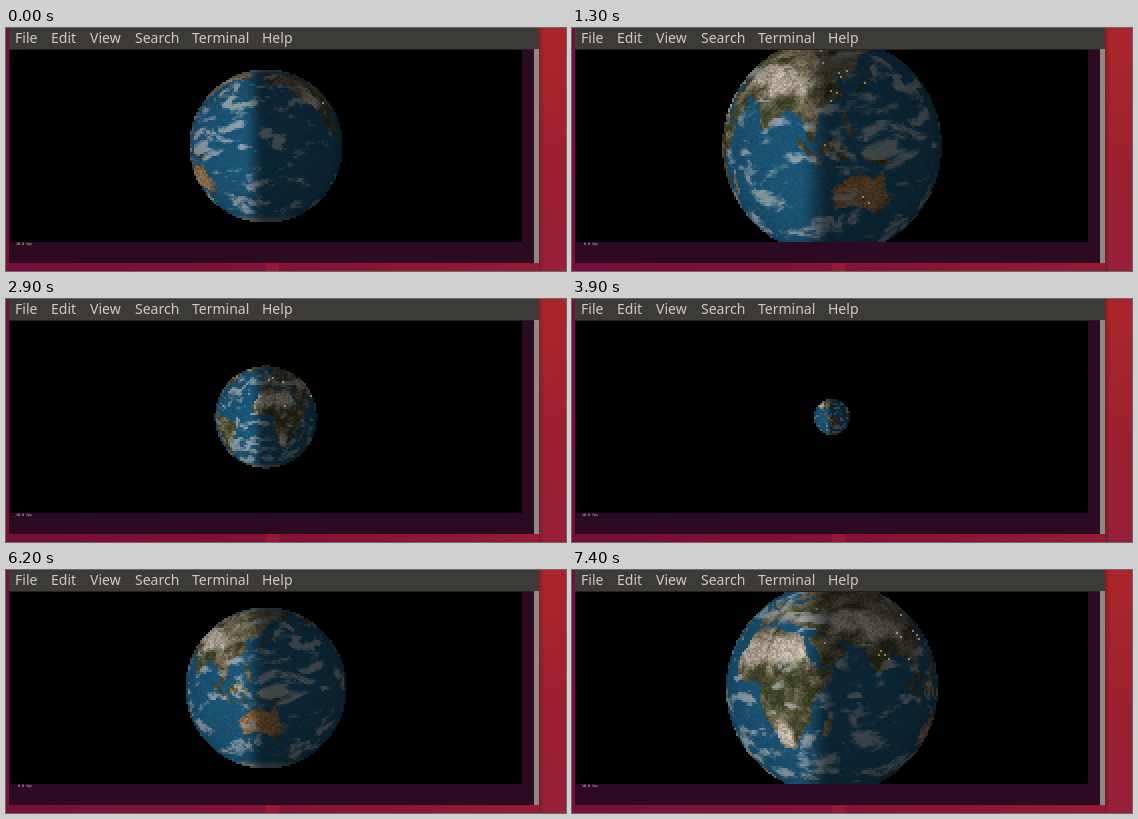
Animation of 560 by 243 pixels, one loop 7500 ms. Source, as an HTML page with a canvas:

```html
<!DOCTYPE html>
<html lang="en">
<head>
<meta charset="utf-8">
<title>Terminal globe</title>
<style>
html, body { margin: 0; width: 100%; height: 100%; overflow: hidden; }
#stage { position: relative; width: 560px; height: 243px; overflow: hidden;
  background: linear-gradient(90deg, #760f3c, #7c1038 30%, #8c1535 70%, #971d33); }
#stage > * { position: absolute; }
.side { left: 533px; top: 0; width: 27px; height: 243px;
  background: linear-gradient(90deg, #0003, #0000 5px), linear-gradient(170deg, #ab262b, #9c2030 55%, #98203a); }
.glow { left: 260px; top: 235px; width: 13px; height: 8px; background: #961938; }
.window { left: 3px; top: 0; width: 530px; height: 235px; background: #2c0a21; }
.menu { left: 3px; top: 0; width: 530px; height: 21px; background: #3c3b37; border-bottom: 1px solid #24221f; }
.menu span { position: absolute; top: 0; color: #cfcac1;
  font: 14px/20px "Noto Sans", "Open Sans", sans-serif; white-space: pre; }
.scroll { left: 528px; top: 21px; width: 5px; height: 214px; background: #8f8985; }
#globe { left: 4px; top: 22px; width: 512px; height: 192px; background: #000; image-rendering: pixelated; }
svg { left: 0; top: 210px; }
</style>
</head>
<body>
<div id="stage">
  <div class="side"></div>
  <div class="glow"></div>
  <div class="window"></div>
  <div class="menu">
    <span style="left:6px">File</span><span style="left:42px">Edit</span>
    <span style="left:81px">View</span><span style="left:126px">Search</span>
    <span style="left:183px">Terminal</span><span style="left:253px">Help</span>
  </div>
  <div class="scroll"></div>
  <canvas id="globe" width="256" height="96"></canvas>
  <svg width="60" height="12"><text id="fps" x="10" y="7.2" fill="#e4dfe2"
    font-family="DejaVu Sans Mono, monospace" font-size="3.33"></text></svg>
</div>
<script>
const LOOP = 7500, STEP = 100, HITCHES = [12, 35, 61];
const W = 256, H = 96, MW = 480, MH = 240, SCALE = MW / 360, RAD = Math.PI / 180;

const ease = v => { v = Math.min(1, Math.max(0, v)); return v * v * (3 - 2 * v); };
const mix = (a, b, t) => a.map((v, i) => v + (b[i] - v) * t);
const rgb = hex => [16, 8, 0].map(s => hex >> s & 255);
const wrap = lon => ((lon + 180) % 360 + 360) % 360 - 180;
// Soft bump on the map, 1 in the middle and falling off over w by h degrees.
const bump = (lon, lat, [x, y, w, h]) =>
  Math.exp(-((wrap(lon - x) / w) ** 2) - ((lat - y) / h) ** 2);
const bumps = (lon, lat, spots) => Math.max(...spots.map(s => bump(lon, lat, s)));

let seed = 7;
const rnd = () => (seed = (seed * 16807) % 2147483647) / 2147483647;

function hash(x, y, z) {
  let h = Math.imul(x, 374761393) ^ Math.imul(y, 668265263) ^ Math.imul(z, 1274126177);
  h = Math.imul(h ^ h >>> 13, 1274126177);
  return ((h ^ h >>> 16) >>> 0) / 2 ** 32;
}
function noise(x, y, z) {
  const a = Math.floor(x), b = Math.floor(y), c = Math.floor(z);
  const u = ease(x - a), v = ease(y - b), w = ease(z - c);
  let sum = 0;
  for (let i = 0; i < 8; i++) {
    const dx = i & 1, dy = i >> 1 & 1, dz = i >> 2;
    sum += hash(a + dx, b + dy, c + dz) * (dx ? u : 1 - u) * (dy ? v : 1 - v) * (dz ? w : 1 - w);
  }
  return sum;
}
function fbm(x, y, z, octaves = 4) {
  let sum = 0, total = 0;
  for (let k = 0, amp = 1, f = 1; k < octaves; k++, amp *= .55, f *= 2.1) {
    sum += amp * noise(x * f, y * f, z * f);
    total += amp;
  }
  return sum / total;
}

// Key points (longitude, latitude) of the coasts; roughened when drawn.
const coasts = {
  africa: [-17,15, -8,34, 10,37, 32,31, 43,12, 51,11, 40,-5, 39,-17, 26,-34, 18,-33, 9,3, -8,5],
  eurasia: [-9,37, -9,43, 8,54, 22,55, 40,67, 105,77, 179,69, 160,60, 138,55, 128,40, 118,39,
    121,29, 108,20, 103,2, 97,17, 89,22, 77,8, 70,22, 48,30, 36,36, 24,38, 18,41, 9,44, -1,38],
  arabia: [35,31, 48,31, 59,22, 44,13],
  nordic: [6,59, 18,58, 40,66, 25,71],
  northAmerica: [-166,66, -125,70, -82,68, -94,60, -78,57, -56,52, -81,31, -81,26, -97,28, -92,18,
    -78,8, -105,20, -124,41, -135,58, -160,57],
  southAmerica: [-77,8, -50,0, -35,-7, -48,-27, -69,-54, -71,-18, -81,-4],
  greenland: [-70,78, -25,82, -22,72, -45,60],
  australia: [114,-22, 116,-34, 131,-31, 147,-39, 153,-29, 142,-11, 137,-16, 130,-12]
};
// Island chains: from, to, half width.
const chains = [[96,5, 106,-5, 2], [106,-7, 122,-9, 1], [131,-2, 149,-8, 3], [131,32, 143,43, 1.4],
  [121,18, 125,7, 1.8], [168,-46, 177,-38, 1.6], [-4,51, -4,57, 2], [46,-24, 49,-14, 2],
  [111,0, 117,3, 4], [120,-4, 122,1, 1.5]];

function roughEdge(g, ax, ay, bx, by) {
  const len = Math.hypot(bx - ax, by - ay);
  if (len < 1.5) return g.lineTo(bx, by);
  const off = (rnd() - .5) * .26;
  const mx = (ax + bx) / 2 - (by - ay) * off, my = (ay + by) / 2 + (bx - ax) * off;
  roughEdge(g, ax, ay, mx, my);
  roughEdge(g, mx, my, bx, by);
}
function landMask() {
  const g = document.createElement("canvas").getContext("2d");
  g.canvas.width = MW;
  g.canvas.height = MH;
  g.setTransform(SCALE, 0, 0, -SCALE, MW / 2, MH / 2);
  for (const p of Object.values(coasts)) {
    g.beginPath();
    for (let i = 0, n = p.length; i < n; i += 2)
      roughEdge(g, p[i], p[i + 1], p[(i + 2) % n], p[(i + 3) % n]);
    g.fill();
  }
  for (const [ax, ay, bx, by, size] of chains)
    for (let t = 0; t <= 1; t += .12) {
      g.beginPath();
      g.arc(ax + (bx - ax) * t, ay + (by - ay) * t, size * (.5 + .7 * rnd()), 0, 7);
      g.fill();
    }
  return g.getImageData(0, 0, MW, MH).data;
}

const sea = rgb(0x1b587b), green = rgb(0x474a2c), olive = rgb(0x6f684f), sand = rgb(0xbdb1a2),
  red = rgb(0x9c7146), ice = rgb(0x949b9f), cloud = rgb(0xb2b9bd), lamp = rgb(0xb9b7a8);
const deserts = [[-2,23,19,10], [20,23,16,10], [84,36,20,9], [62,42,18,10], [20,-25,7,8], [-110,38,9,9]];
const outback = [129,-25,20,12];
const storms = [[78,-3,13,12], [168,26,16,13], [178,-27,12,12], [235,-28,12,8], [155,-5,18,7]];
const hubs = [[117,33,8,9], [137,36,5,6], [78,22,7,9], [10,48,14,7], [-82,38,11,7]];

const map = new Uint8ClampedArray(MW * MH * 3), cities = new Uint8Array(MW * MH);

function buildMap() {
  const mask = landMask();
  for (let i = 0; i < MW * MH; i++) {
    const lon = (i % MW + .5) / SCALE - 180, lat = 90 - (Math.floor(i / MW) + .5) / SCALE;
    const ring = Math.cos(lat * RAD), y = Math.sin(lat * RAD);
    const x = ring * Math.cos(lon * RAD), z = ring * Math.sin(lon * RAD);
    const grain = rnd() - .5, land = mask[i * 4 + 3] / 255;
    const relief = fbm(x * 9 + 20, y * 9, z * 9);
    const dry = bumps(lon, lat, deserts);

    let soil = mix(green, olive, ease((relief - .4) * 3 + Math.abs(lat) / 120));
    soil = mix(soil, sand, ease(dry * 1.5 + (relief - .5) * 1.2 - .15));
    soil = mix(soil, red, ease(bump(lon, lat, outback) * 1.4));
    soil = soil.map(v => v * (.75 + relief * .5 + grain * .3));
    let color = mix(sea.map(v => v * (1 + grain * .12)), soil, land);

    const frost = ease(((lat < 0 ? -lat : lat - 8) - 60) / 16);
    color = mix(color, ice, frost * (.75 + relief * .3));

    // Clouds: warped noise, denser at storms and along the southern westerlies.
    const bend = noise(x * 4, y * 4, z * 4 + 50) * 1.6;
    const cover = fbm(x * 5 + bend, y * 10 - bend, z * 5 + bend)
      + .13 * bumps(lon, lat, storms) + .08 * bump(0, lat, [0, -46, 1, 9])
      + .03 * bump(0, lat, [0, 45, 1, 12]) - .12 * dry * land;
    color = mix(color, cloud, .8 * ease((cover - .55) / .2));

    map.set(color, i * 3);
    const crowd = .002 + .075 * bumps(lon, lat, hubs);
    cities[i] = land > .5 && lat < 62 && rnd() < crowd ? 1 : 0;
  }
}
buildMap();

const ctx = document.getElementById("globe").getContext("2d");
const fps = document.getElementById("fps");
const image = ctx.createImageData(W, H);
const tiltSin = Math.sin(2 * RAD), tiltCos = Math.cos(2 * RAD);

function drawGlobe(n) {
  // The radius swings evenly in and out while the globe turns at a steady rate.
  const away = Math.abs((n - 10.5 + 29 + 58) % 58 - 29);
  const r = 115.2 - 3.66 * away, centre = 201 - 7.2 * n;
  const out = image.data.fill(0);
  for (let j = 0, o = 0; j < H; j++) {
    const y = (H - 1 - 2 * j) / r;
    for (let i = 0; i < W; i++, o += 4) {
      const x = (2 * i - W + 1) / r, zz = 1 - x * x - y * y;
      if (zz < 0) continue;
      const z = Math.sqrt(zz);
      const lat = Math.asin(y * tiltCos + z * tiltSin) / RAD;
      const lon = wrap(centre + Math.atan2(x, z * tiltCos - y * tiltSin) / RAD);
      const u = Math.min(MW - 1, Math.floor((lon + 180) * SCALE));
      const v = Math.min(MH - 1, Math.floor((90 - lat) * SCALE));
      const p = v * MW + u;
      const day = ease((-.01 - x) / .3);
      const light = (.42 + .56 * day) * (.58 + .42 * Math.sqrt(z));
      const lit = cities[p] * (1 - day) * .65;
      for (let c = 0; c < 3; c++)
        out[o + c] = map[p * 3 + c] * light * (1 - lit) + lamp[c] * lit;
      out[o + 3] = 255;
    }
  }
  ctx.putImageData(image, 0, 0);
}

let shown = -1;
function tick() {
  const k = Math.floor(performance.now() % LOOP / STEP);
  if (k !== shown) {
    shown = k;
    drawGlobe(k - HITCHES.filter(h => k >= h).length);
    const slow = HITCHES.includes(k - 1);
    fps.textContent = slow ? "9.9 fps" : "10.0 fps";
    fps.setAttribute("x", slow ? 12 : 10);
  }
  requestAnimationFrame(tick);
}
tick();
</script>
</body>
</html>
```
